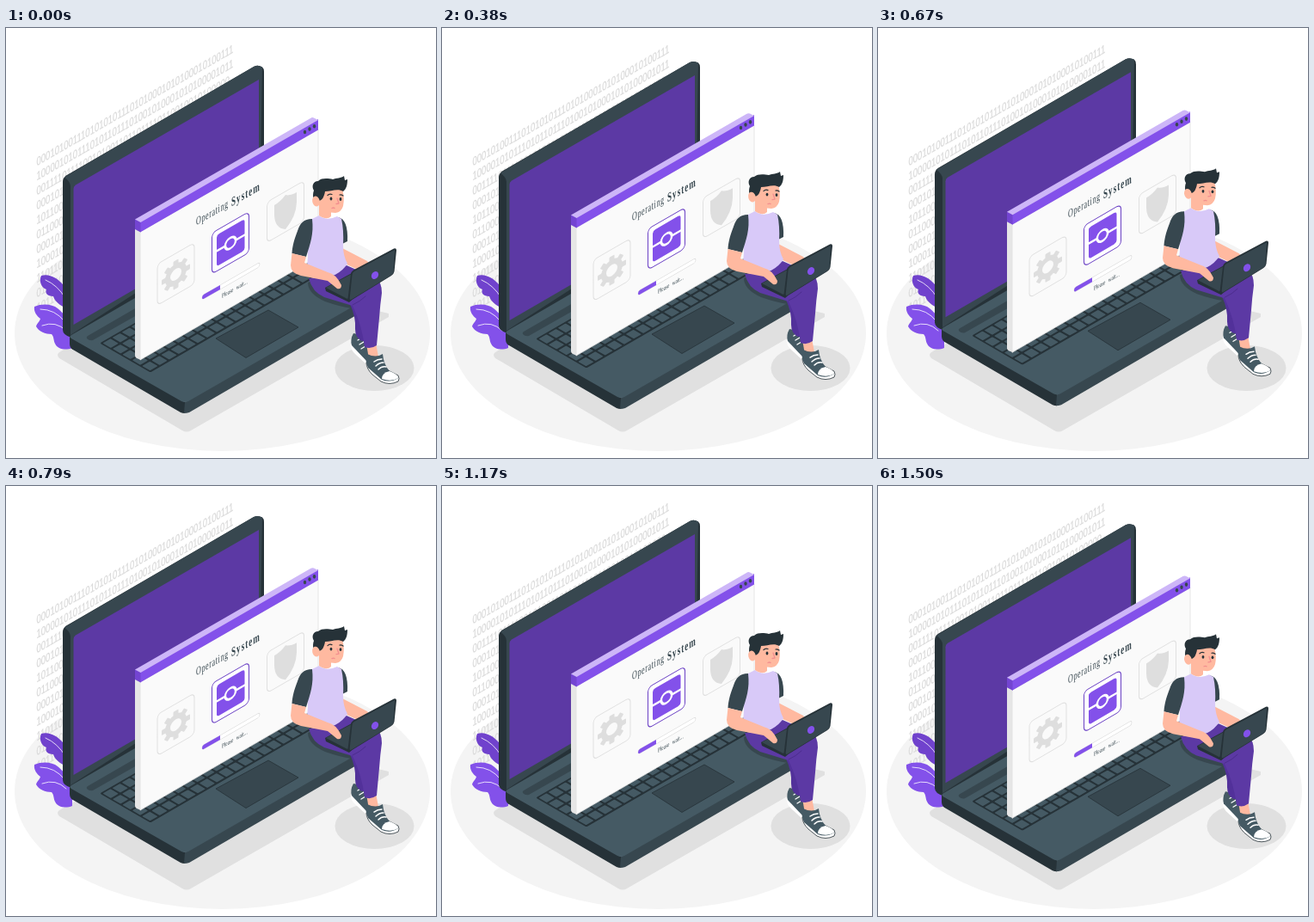
An HTML page that plays this animation: 500 by 500 pixels, repeating every 1.54 s.

```html
<!DOCTYPE html>
<html lang="en">
<head>
<meta charset="utf-8">
<title>Operating System</title>
<style>
html, body { margin: 0; width: 100%; height: 100%; overflow: hidden; background: #fff; }
svg { display: block; width: 100vw; height: 100vh; }
.main { fill: #8351ea; }
.deep { fill: #5c39a4; }
.ink { fill: #263238; }
.slate { fill: #37474f; }
.steel { fill: #455a64; }
.skin { fill: #ffb9a0; }
.grey { fill: #e0e0e0; }
.white { fill: #fff; }
.line { fill: none; stroke-linecap: round; stroke-linejoin: round; }
#binary { font: 14px "Liberation Sans", Arial, sans-serif; fill: #dadada; stroke: #dadada; stroke-width: .3; }
.serif { font-family: "Liberation Serif", "Times New Roman", serif; fill: #37474f; }
</style>
</head>
<body>
<svg viewBox="0 0 500 500">
  <ellipse cx="251.5" cy="355" rx="241.5" ry="137" fill="#f4f4f4"/>
  <path class="grey" d="M62 377L230 280 445 332V336L215 468Q210 471 205 468L62 384Q58 380 62 377Z"/>
  <ellipse class="grey" cx="428.5" cy="395.5" rx="46" ry="26.5"/>
  <g id="binary"></g>

  <g id="plant">
    <path fill="#7042cd" d="M70 326C62 322 57 318 55 312C48 312 45 308 47 304C41 302 38 294 41 288C50 285 60 291 66 298L72 304Z"/>
    <path class="main" d="M77 372C70 375 60 374 57 367C55 363 56 359 53 356C46 356 38 353 35 347C36 343 39 342 40 338C36 335 32 330 33 324C42 320 54 321 60 326C66 331 68 334 72 338L77 350Z"/>
    <path class="line" stroke="#fff" stroke-width=".8" d="M46 293Q60 299 69 314M40 327Q57 327 68 341M42 346Q58 340 70 352"/>
  </g>

  <g id="float">
    <g id="lid">
      <path class="ink" d="M66 179Q66 174 70 171.500L288 45Q293 42.500 298 45.500Q300 47 300 51V235L76 360Q66 357 66 351Z"/>
      <path class="slate" d="M68 173.500L288 45Q293 42.500 298 45.500L295 215 75 357V184Q75 179 68 173.500Z"/>
      <path class="deep" d="M78.500 187Q78.500 184 81 182.500L294 60V220L78.500 345Z"/>
    </g>

    <g id="base">
      <path class="ink" d="M74 359L208 435V448Q205 448 203 447L77 373.500Q74 371 74 367Z"/>
      <path class="slate" d="M208 435L433 306V319L213 447Q210 448 207 448Z"/>
      <path class="steel" d="M76 357L298 228Q302 226 306 229L431 304Q434 306 431 308L212 434Q208 436 204 434L76 361Q73 359 76 357Z"/>
      <path class="slate" d="M95 358L152 325V334L101 363Q97 364 94 361Q93 359 95 358Z"/>
      <g id="keys" transform="matrix(.866 -.5 .866 .5 109 366.500)">
        <rect class="ink" width="220" height="68" rx="2"/>
      </g>
      <path class="slate" stroke="#263238" stroke-width=".8" d="M244 361L305 328 340 348 279 383.500Z"/>
      <path class="slate" d="M351 296Q362 290 385 296L412 318 402 326Q388 324 371 318Q351 309 351 296Z"/>
    </g>

    <g id="window">
      <path fill="#e6e6e6" d="M150 232L157 236V386L152 384Q150 383 150 381Z"/>
      <path fill="#fafafa" stroke="#e0e0e0" stroke-width=".8" d="M156 237L363 118V264Q363 266 361 267L156 386Z"/>
      <path class="main" d="M156 225L363 106V118.500L156 237.500Z"/>
      <path fill="#7344d2" d="M150 222L156.500 225.500V237.500L150 234Z"/>
      <path fill="#cdb6f8" d="M150 222.500L354 105Q356 103.500 358 104.500L363 107 156.500 226Z"/>
      <g class="slate">
        <ellipse cx="347.500" cy="121" rx="1.700" ry="2.300"/>
        <ellipse cx="353" cy="117.500" rx="1.700" ry="2.300"/>
        <ellipse cx="358.500" cy="114.300" rx="1.700" ry="2.300"/>
      </g>
      <text class="serif" font-size="13.500" letter-spacing="1" transform="matrix(.6 -.343 0 1 221 229.500)">Operating</text>
      <text class="serif" font-size="15" letter-spacing="1.800" font-weight="bold" transform="matrix(.6 -.343 0 1 262 207.500)">System</text>
      <text class="serif" font-size="7.500" word-spacing="3" transform="matrix(.7 -.4 0 1 251 314)">Please wait...</text>

      <g id="gear" transform="matrix(1 -.577 0 1 176 274.500)">
        <rect class="line" width="43" height="48" rx="5" stroke="#e0e0e0"/>
        <circle class="line" cx="21.500" cy="24.500" r="9.500" stroke="#dedede" stroke-width="6"/>
      </g>
      <g transform="matrix(1 -.577 0 1 239.500 238.500)">
        <rect width="43" height="47.500" rx="5" fill="#fff" stroke="#6a40c4"/>
        <rect class="main" x="5.500" y="5.500" width="32.500" height="36.500" rx="3"/>
        <path class="line" stroke="#fff" stroke-width="2.600" stroke-linecap="butt" d="M5 24H15M28 24H39"/>
        <circle class="white" cx="21.500" cy="24" r="7.500"/>
        <circle class="main" cx="21.500" cy="24" r="4.800"/>
      </g>
      <g transform="matrix(1 -.577 0 1 303.500 202.500)">
        <rect class="line" width="43" height="47" rx="5" stroke="#e0e0e0"/>
        <path fill="#dedede" d="M21.500 4Q27 8.500 34.500 8.500V20Q34 36 21.500 44Q9 36 8.500 20V8.500Q16 8.500 21.500 4Z"/>
      </g>
      <g transform="matrix(1 -.577 0 1 228 311)">
        <rect width="67" height="5" rx="2.500" fill="#fff" stroke="#dedede" stroke-width=".8"/>
        <path class="main" d="M21 0V5H2.500A2.500 2.500 0 0 1 2.500 0Z"/>
      </g>
    </g>

    <g id="person">
      <g id="backShoe">
        <path class="white" d="M401 369Q401 375 407 380L418 390 421 384 403 365Z"/>
        <path class="steel" d="M404 355Q400 362 402 369L419 387 422 376 414 357Z"/>
        <path class="line" stroke="#fff" stroke-width="1.300" d="M409 363L414 360M411 368L416 365M413 373L418 370"/>
      </g>
      <path fill="#52319a" d="M385 309L415 310 420 362 414 364Q406 360 406 350Q407 336 400 321Z"/>
      <path class="skin" d="M419 367L430 366 433 382 422 385Z"/>
      <path class="deep" d="M352 291Q370 290 396 276L430 291Q437 295 437 308Q435 322 434 337L431 369Q424 374 417 371Q414 346 403 323L370 313Q356 307 352 291Z"/>
      <path class="line" stroke="#4c2d8d" d="M403 322Q412 318 418 312"/>
      <g id="frontShoe">
        <path class="white" stroke="#263238" stroke-width=".8" d="M419 389Q419 396 426 403L436 411Q446 416 456 411Q458 408 456 404L430 391Z"/>
        <path class="steel" d="M420 379Q417 388 421 395L437 409Q447 413 456 407Q454 402 446 399Q439 391 438 379Q430 384 420 379Z"/>
        <path class="white" d="M437 408Q437 401 446 399Q455 402 456 407Q448 412 437 408Z"/>
        <path class="line" stroke="#fff" stroke-width="1.500" d="M428 388Q432 385 437 385M430 393Q434 389 439 389M433 397Q437 393 442 394"/>
      </g>

      <path class="skin" d="M391 256L420 271Q425 276 419 280L409 281 390 272Z"/>
      <path class="slate" d="M386 220Q398 222 397 248L391 251Z"/>
      <path fill="#d8c9f8" d="M354 223L364 218Q373 225 385 219L390 222Q393 235 392 253Q392 265 397 274Q386 291 363 291Q354 291 348 287Q354 265 348 244Z"/>
      <path class="slate" d="M356 222C346 222 342 227 339 236C335 246 333 254 332.500 262L349 266C354 250 358 240 356 222Z"/>

      <g id="laptop">
        <path class="ink" d="M371 302L402 285 429 291 399 319 372 306Z"/>
        <path class="slate" d="M372 302L402 286 420 294 397 315Z"/>
        <path class="ink" d="M401 286.500Q401 283.500 404 281.500L451 256.500Q454 255.500 454 258.500L451.500 283Q451 286 448 288L400 317.500Q397 319 397.500 315Z"/>
        <path class="slate" d="M402.500 287Q402.500 284.500 405 283L452 258L450.500 284Q450 286 447 288L401 316Q399.500 316.500 399.700 314Z"/>
        <ellipse class="main" cx="429" cy="287.500" rx="3.800" ry="4.800" transform="rotate(35 429 287.500)"/>
      </g>

      <path class="skin" d="M332.500 262L349 266 347 273 374 284Q384 286 390 299Q390 304 385 303L374 294 343 288Q331 285 331 276Z"/>

      <g id="head">
        <path class="skin" d="M364 188L391 187Q394 198 392 207Q390 214 383 215L378 214.500V219Q373 224 364 218V205Z"/>
        <path class="ink" d="M362 206C357 203 356 194 358 189C355 184 357 178 363 178C367 174 375 175 380 176C384 174 390 175 393 172L394 177 397 176C397 182 396 187 392 190C386 186 378 190 371 190C370 196 368 200 364 201Z"/>
        <ellipse class="skin" cx="360.500" cy="201.500" rx="4.300" ry="6" transform="rotate(-15 360.500 201.500)"/>
        <g class="ink">
          <ellipse cx="378" cy="198.500" rx="1.400" ry="1.900"/>
          <ellipse cx="389" cy="199" rx="1.400" ry="1.900"/>
        </g>
        <path class="line" stroke="#263238" stroke-width="1.200" d="M374 194.500Q376 192.500 379 193.500M388 194Q390 193.500 392 195"/>
        <path class="line" stroke="#f28f8f" stroke-width="1.300" d="M385 198L387 204 384 204.500M379 209.500Q381 208.500 382 209.500"/>
      </g>
    </g>
  </g>
</svg>
<script>
const $ = id => document.getElementById(id);
function add(parent, name, attrs, text = '') {
  const node = document.createElementNS('http://www.w3.org/2000/svg', name);
  for (const key in attrs) node.setAttribute(key, attrs[key]);
  node.textContent = text;
  parent.append(node);
}

// Wall of binary digits
const rows = ['00010100111010101011101010001010100010100111',
              '10000101011101011011101001010001010100001011'];
let seed = 7;
const bit = () => (seed = seed * 16807 % 2147483647) % 100 < 55 ? '0' : '1';
for (let row = 0; row < 11; row++) {
  const digits = rows[row] || Array.from({length: 44}, bit).join('');
  add($('binary'), 'text', {transform: `matrix(.681 -.393 0 1 35.5 ${160.5 + row * 17})`}, digits);
}

for (let row = 0; row < 5; row++)
  for (let col = 0; col < 17; col++)
    add($('keys'), 'rect', {class: 'steel', x: 2 + col * 12.8, y: 2 + row * 13.2,
      width: 10.4, height: 10.8, rx: 1});

for (let tooth = 0; tooth < 8; tooth++)
  add($('gear'), 'rect', {fill: '#dedede', x: 18.5, y: 8, width: 6, height: 6, rx: 1,
    transform: `rotate(${tooth * 45} 21.5 24.5)`});

// Constant-speed rise and fall
const LOOP = 1540;
function draw(now) {
  const phase = (now + 30) % LOOP / LOOP;
  const rise = 1 - Math.abs(1 - 2 * phase);
  $('float').setAttribute('transform', `translate(0 ${0.4 - 10 * rise})`);
}
const start = performance.now();
function tick() {
  draw(performance.now() - start);
  requestAnimationFrame(tick);
}
tick();
</script>
</body>
</html>
```
